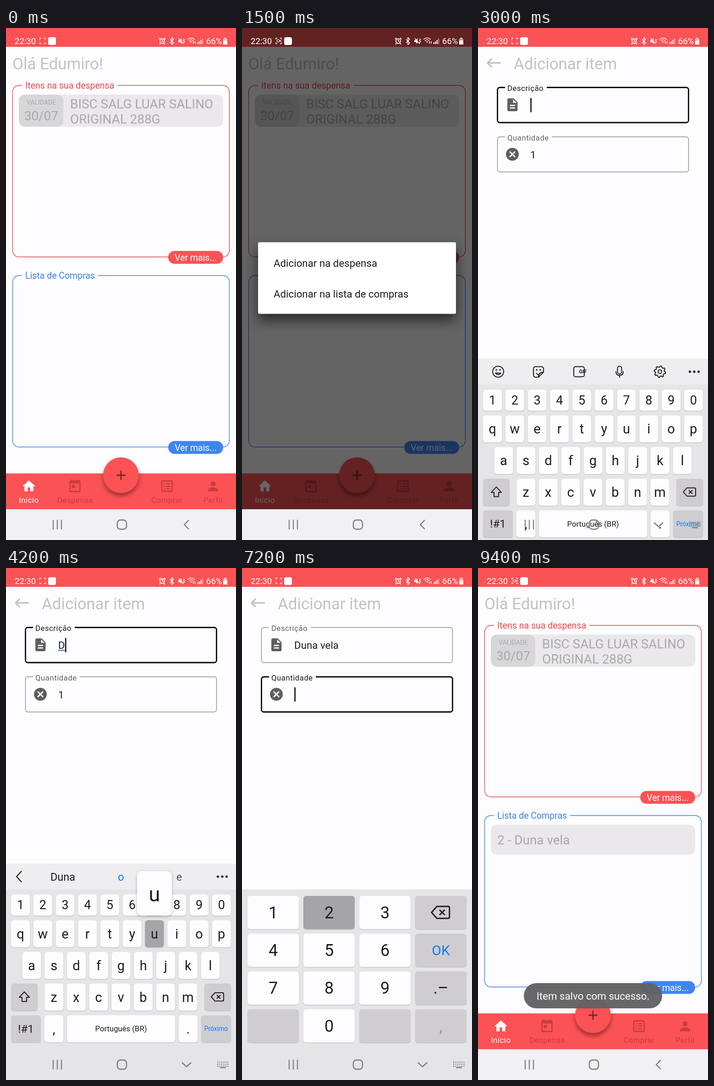
Write an HTML page with a canvas that moves like this. It is 502 px wide and 1115 px high and loops after 9.5 s.

```html
<!DOCTYPE html>
<html lang="pt-BR">
<head>
<meta charset="utf-8">
<title>Lista de compras</title>
<style>
html, body { margin: 0; width: 100%; height: 100%; overflow: hidden; background: #fdfcfe; }
canvas { display: block; width: 502px; height: 1115px; }
</style>
</head>
<body>
<canvas id="stage"></canvas>
<script>
const W = 502, H = 1115, NAV = 1048, LOOP = 9500, STEP = 100;
const PAPER = '#fdfcfe', RED = '#fb5255', BLUE = '#3f85f0', FAINT = '#c3c2c4', INK = '#1d1c1e';
const LINK = '#0a7cf5', KEY = '#fdfcfe', KEY_GRAY = '#cfcdd0', KEY_DOWN = '#a5a4a7', KEYBOARD = '#e5e4e7';

const canvas = document.getElementById('stage');
const ratio = window.devicePixelRatio || 1;
canvas.width = W * ratio;
canvas.height = H * ratio;
const ctx = canvas.getContext('2d');

const ramp = (t, from, to) => Math.min(1, Math.max(0, (t - from) / (to - from)));
const easeOut = u => 1 - (1 - u) ** 3;
const mix = (a, b, u) => a + (b - a) * u;
const during = (t, from, to) => t >= from && t < to;

function group(drawing, { x = 0, y = 0, scale = 1, alpha = 1 } = {}) {
  ctx.save();
  ctx.translate(x, y);
  ctx.scale(scale, scale);
  ctx.globalAlpha *= alpha;
  drawing();
  ctx.restore();
}
function text(str, x, y, size, color, align = 'left', spacing = 0) {
  ctx.font = `${size}px Roboto, sans-serif`;
  ctx.letterSpacing = spacing + 'px';
  ctx.textAlign = align;
  ctx.fillStyle = color;
  ctx.fillText(str, x, y);
}
function rect(x, y, w, h, color) {
  ctx.fillStyle = color;
  ctx.fillRect(x, y, w, h);
}
function box(x, y, w, h, r, fill, stroke, width) {
  ctx.beginPath();
  ctx.roundRect(x, y, w, h, r);
  if (fill) { ctx.fillStyle = fill; ctx.fill(); }
  if (stroke) { ctx.strokeStyle = stroke; ctx.lineWidth = width; ctx.stroke(); }
}
function disc(x, y, r, color) {
  ctx.beginPath();
  ctx.arc(x, y, r, 0, 7);
  ctx.fillStyle = color;
  ctx.fill();
}
function shadow(color, blur, y, drawing) {
  ctx.save();
  ctx.shadowColor = color;
  ctx.shadowBlur = blur * ratio;
  ctx.shadowOffsetY = y * ratio;
  drawing();
  ctx.restore();
}
// Strokes an SVG path whose origin is placed at (x, y).
function line(d, x, y, color, width, cap = 'butt') {
  ctx.save();
  ctx.translate(x, y);
  ctx.strokeStyle = color;
  ctx.lineWidth = width;
  ctx.lineCap = cap;
  ctx.lineJoin = 'round';
  ctx.stroke(new Path2D(d));
  ctx.restore();
}
function shape(d, x, y, color, scale = 1.394) {
  group(() => {
    ctx.fillStyle = color;
    ctx.fill(new Path2D(d), 'evenodd');
  }, { x, y, scale });
}

function statusBar(t) {
  const white = '#fff';
  text('22:30', 19, 35, 18.5, white);
  line('M-6-3V-6H-3M3-6H6V-3M6 3V6H3M-3 6H-6V3', 80, 28, white, 1.3);
  if (during(t % 1000, 400, 900)) {
    box(76.5, 25.5, 5, 5, 1, null, white, 1.2);
    line('M2 0L5-2V2Z', 80, 28, white, 1);
  }
  box(92, 20, 17, 17, 4, white);

  line('M-5 0a5 5 0 1 0 10 0a5 5 0 1 0-10 0M0-3V0L3 1M-7-4L-4-7M7-4L4-7M-4 5L-6 7M4 5L6 7', 341, 28.5, white, 1.8);
  line('M-4-4L4 4L0 8V-8L4-4L-4 4', 362, 28.5, white, 1.5);
  shape('M-7-2H-4L0-6V6L-4 2H-7Z', 383, 28.5, white, 1);
  line('M-7-6L4 6M3-5L6-3L3-1L6 1L3 4', 384, 28.5, white, 1.5);
  line('M-8-3Q0-10 8-3M-5 0Q0-5 5 0M-2 3Q0 1 2 3M5 6V1M9 1V6', 404, 28, white, 1.6);
  [4, 6, 9, 12].forEach((h, i) => rect(418 + i * 3.4, 35 - h, 2, h, i < 3 ? white : '#ffffff88'));
  text('66%', 437, 35, 18.5, white);
  rect(476, 21, 5, 3, '#ffffff99');
  box(474, 23, 9, 13, 1.5, '#ffffff88');
  rect(474, 27, 9, 9, white);
}

function navIcons(keyboardOpen, color) {
  line('M-9-10V11M0-10V11M9-10V11', 112, 1081, color, 2.2);
  box(243, 1071.5, 20, 20, 6.5, null, color, 2.4);
  if (!keyboardOpen) return line('M5-10L-5 0L5 10', 394, 1081.5, color, 2.4);
  line('M-10-4L0 5L10-4', 394, 1081, color, 2.4);
  for (let i = 0; i < 18; i++) rect(461 + i % 6 * 4.5, 1075 + Math.floor(i / 6) * 4.5, 2.2, 2.2, color);
  rect(467, 1087, 13, 2.2, color);
}

function panel(y, title, gapEnd, color, pill) {
  box(14.5, y, 473, 373.5, 14, null, color, 1.4);
  rect(35, y - 3, gapEnd - 35, 6, PAPER);
  text(title, 42, y + 6.5, 19.5, color);
  box(354, y + 360.5, 120, 28, 14, pill);
  text('Ver mais...', 414, y + 381.5, 19.5, '#fff', 'center');
}

function tab(label, x, color) {
  text(label, x, 1034, 16.7, color, 'center', 0.55);
}

function home(t, saved) {
  rect(0, 0, W, H, PAPER);
  rect(0, 0, W, 41, RED);
  text('Olá Edumiro!', 14, 89.5, 34.9, FAINT);

  panel(125, 'Itens na sua despensa', 243, '#e84a4c', RED);
  box(28, 145, 446, 70, 13, '#eae8ea');
  box(28, 145, 97, 70, 13, '#d7d6d8');
  text('VALIDADE', 77, 167, 13.9, '#a9a8aa', 'center');
  text('30/07', 77, 201, 27.9, '#a9a8aa', 'center');
  text('BISC SALG LUAR SALINO', 140, 175, 27.9, '#a9a8aa');
  text('ORIGINAL 288G', 140, 208, 27.9, '#a9a8aa');

  panel(539, 'Lista de Compras', 201, '#3a82e4', BLUE);
  if (saved) {
    box(28, 559, 446, 65, 13, '#eae8ea');
    text('2 - Duna vela', 42, 602, 27.9, '#a9a8aa');
  }

  const dark = '#cc3c40';
  rect(0, 970, W, 78, RED);
  shape('M10 20v-6h4v6h5v-8h3L12 3 2 12h3v8z', 33.3, 981, '#fff');
  tab('Início', 50, '#fff');
  box(139.5, 986.5, 22, 23, 2, null, dark, 2.8);
  rect(139, 986, 23, 6, dark);
  rect(142, 983, 3, 4, dark);
  rect(156, 983, 3, 4, dark);
  rect(143.5, 995, 7, 7, dark);
  tab('Despensa', 151, dark);
  box(340, 986.5, 22.5, 22.5, 1.5, null, dark, 2.8);
  for (let i = 0; i < 3; i++) {
    rect(344.5, 991 + i * 5.6, 2.8, 2.8, dark);
    rect(350, 991 + i * 5.6, 8.4, 2.8, dark);
  }
  tab('Comprar', 351.5, dark);
  disc(452, 992.5, 5.6, dark);
  shape('M12 14c-2.7 0-8 1.3-8 4v2h16v-2c0-2.7-5.3-4-8-4z', 435.3, 981, dark);
  tab('Perfil', 452, dark);

  shadow('#0006', 10, 6, () => disc(251, 974, 39, RED));
  const ripple = ramp(t, 100, 400);
  if (during(t, 100, 700)) disc(251, 974, 39 * ripple, `rgba(0,0,0,${0.12 * (1 - ramp(t, 400, 700))})`);
  line('M-10 0H10M0-10V10', 251, 974, '#7a282b', 2.9);
  rect(0, NAV, W, H - NAV, '#f1f0f3');
}

function dialog(t) {
  const leave = ramp(t, 1600, 1750);
  const shown = ramp(t, 600, 850) * (1 - leave);
  if (!shown) return;
  rect(0, 0, W, NAV, `rgba(0,0,0,${0.6 * shown})`);
  const scale = mix(0.9, 1, easeOut(ramp(t, 600, 1000)));
  group(() => {
    shadow('#0009', 28, 14, () => box(35, 466.5, 432, 156, 3, '#fff'));
    if (t >= 1600) rect(35, 545, 432, 67, '#0000000f');
    text('Adicionar na despensa', 69, 519.5, 22.3, INK);
    text('Adicionar na lista de compras', 69, 586.5, 22.3, INK);
  }, { x: 251 * (1 - scale), y: 544.5 * (1 - scale), scale, alpha: shown });
}

// Each press: time down and key; the character is committed 100 ms later.
const presses = [[3800, 'shift'], [4000, 'D'], [4200, 'u'], [4400, 'n'], [4600, 'a'], [4800, ' '],
  [4900, 'v'], [5030, 'e'], [5160, 'l'], [5280, 'a']];
const PRESS = 100, NUMERIC_AT = 5900;
const typedAt = t => presses.filter(([at, key]) => key.length === 1 && at + PRESS <= t).map(p => p[1]).join('');
const pressedAt = t => (presses.find(([at]) => during(t, at, at + PRESS)) || [])[1];
const quantityAt = t => t < 6900 ? '1' : t < 7300 ? '' : '2';

function caretVisible(t) {
  if (t < 3800) return during(t, 2500, 3100) || t >= 3600;
  return !during(t, 6400, 6900) && t < 7800;
}

function field(y, label, gapEnd, focused, floated) {
  box(42.5, y, 417, 76.5, 5, null, focused ? '#0c0b0d' : '#918f92', focused ? 2.8 : 1.4);
  if (floated) rect(59, y - 4, gapEnd - 59, 8, PAPER);
  text(label, mix(114, 64, floated), mix(y + 47, y + 7.5, floated), mix(22.3, 16.7, floated),
    focused ? INK : '#626063', 'left', 0.55 * floated);
}

function value(str, y, focused, t, composing) {
  text(str, 114, y + 8.5, 22.3, INK);
  const width = ctx.measureText(str).width;
  if (composing) {
    const start = ctx.measureText(str.slice(0, str.lastIndexOf(' ') + 1)).width;
    if (width > start) rect(114 + start, y + 10.5, width - start, 2.6, '#3a8fdc');
  }
  if (focused && caretVisible(t)) rect(114.3 + width, y - 15, 2.6, 31, '#0c0b0d');
}

function addScreen(t) {
  const inDescription = during(t, 2400, NUMERIC_AT), inQuantity = t >= NUMERIC_AT;
  rect(0, 0, W, H, PAPER);
  rect(0, 0, W, 41, RED);
  line('M15 0H-14M-5-9L-14 0L-5 9', 35, 76, FAINT, 3.4);
  text('Adicionar item', 78, 89.5, 34.9, FAINT);

  field(129.5, 'Descrição', 150, inDescription, ramp(t, 2400, 2550));
  shape('M14 2H6C5 2 4 3 4 4V20C4 21 5 22 6 22H18C19 22 20 21 20 20V8ZM16 18H8V16H16ZM16 14H8V12H16ZM13 9V3.5L18.5 9Z', 58.5, 150.5, '#5f5d60');
  if (t >= 2400) value(typedAt(t), 167.5, inDescription, t, inDescription);

  field(237, 'Quantidade', 161, inQuantity, 1);
  disc(75, 275, 14, '#5f5d60');
  line('M-6-6L6 6M6-6L-6 6', 75, 275, '#fff', 2.8);
  value(quantityAt(t), 275, inQuantity, t, false);

  box(70, 951, 362, 69.5, 34.75, '#27a844');
  if (during(t, 8300, 8800)) box(70, 951, 362, 69.5, 34.75, '#0000001c');
  text('SALVAR', 251, 999, 34.9, '#fff', 'center');
  rect(0, NAV, W, H - NAV, '#f1f0f3');
}

function key(x, y, w, h, label, size, fill = KEY, color = INK) {
  shadow('#0003', 1.5, 1, () => box(x, y, w, h, 6, fill));
  text(label, x + w / 2, y + h / 2 + size * 0.35, size, color, 'center');
}
function backspaceIcon(x, y, scale) {
  group(() => line('M-14 0L-6-9H11Q13-9 13-7V7Q13 9 11 9H-6ZM-2-4L6 4M6-4L-2 4', 0, 0, INK, 2), { x, y, scale });
}

function toolbar(typed) {
  const y = 672;
  rect(0, 644, W, 56, '#eeedef');
  [462.5, 472, 481.5].forEach(x => disc(x, y, 2.6, INK));
  if (typed) {
    line('M5-12L-6 0L5 12', 29, y, INK, 2.2);
    text(typed.includes(' ') ? 'vela' : 'Duna', 124, y + 8.5, 23.5, INK, 'center');
    text('o', 251, y + 8.5, 23.5, LINK, 'center');
    text('e', 378, y + 8.5, 23.5, '#555', 'center');
    return;
  }
  box(32, y - 12, 24, 24, 12, null, INK, 2);
  line('M-6 3Q0 10 6 3Z', 44, y, INK, 2);
  line('M0 12H-6Q-11 12-11 6V-6Q-11-11-6-11H6Q11-11 11-6V1L0 12Q0 1 11 1M-5 3Q-3 6 0 6', 132, y, INK, 2);
  [40, 48, 128, 136].forEach(x => disc(x, y - 4, 1.7, INK));
  box(209, y - 11, 23, 22, 4, null, INK, 2);
  ctx.font = 'bold 11px Roboto, sans-serif';
  ctx.fillText('GIF', 220.5, y + 4);
  box(304.5, y - 12, 9, 17, 4.5, null, INK, 2);
  line('M-8-1Q-8 8 0 8Q8 8 8-1M0 8V13', 309, y, INK, 2);
  ctx.beginPath();
  for (let i = 0; i < 32; i++) {
    const r = i % 4 < 2 ? 12.5 : 9.8, a = (i + 0.5) * Math.PI / 16;
    ctx.lineTo(397 + r * Math.cos(a), y + r * Math.sin(a));
  }
  ctx.closePath();
  ctx.strokeStyle = INK;
  ctx.lineWidth = 2;
  ctx.stroke();
  box(393, y - 4, 8, 8, 4, null, INK, 2);
}

const letterRows = [['1234567890', 11, 711, 46], ['qwertyuiop', 11, 767, 59], ['asdfghjkl', 35.5, 836, 59], ['zxcvbnm', 84, 905, 59]];

function letterPad(t) {
  const pressed = pressedAt(t), typed = typedAt(t), upper = during(t, 3900, 4100);
  rect(0, 644, W, H - 644, KEYBOARD);
  toolbar(typed);
  const press = (name, normal) => pressed === name ? KEY_DOWN : normal;
  let popup;
  for (const [chars, left, y, h] of letterRows) {
    [...chars].forEach((c, i) => {
      const x = left + i * 48.75, down = pressed && pressed.toLowerCase() === c;
      const label = upper ? c.toUpperCase() : c;
      key(x, y, 41, h, label, h < 50 ? 27 : 29, down ? KEY_DOWN : KEY);
      if (down) popup = [x + 20.5, y, label];
    });
  }
  key(11, 905, 58, 59, '', 20, press('shift', KEY_GRAY));
  line('M0-11L11 1H5V10H-5V1H-11Z', 40, 934, INK, 2);
  key(433, 905, 58, 59, '', 20, KEY_GRAY);
  backspaceIcon(462, 934, 1);
  key(11, 974, 65, 59, '!#1', 24, KEY_GRAY);
  key(84, 974, 41, 59, ',', 29);
  key(133, 974, 236, 59, 'Português (BR)', 16.7, press(' ', KEY));
  key(377, 974, 41, 59, '.', 29);
  key(426, 974, 65, 59, 'Próximo', 13.9, during(t, 5700, NUMERIC_AT) ? KEY_DOWN : KEY_GRAY, LINK);
  if (popup) {
    const [x, y, label] = popup;
    shadow('#0004', 6, 2, () => box(x - 38, y - 107, 76, 97, 10, KEY));
    text(label, x, y - 41, 45, INK, 'center');
  }
}

function numberPad(t) {
  rect(0, 700, W, H - 700, KEYBOARD);
  const labels = ['1', '2', '3', '', '4', '5', '6', 'OK', '7', '8', '9', '.–', '', '0', '', ','];
  labels.forEach((label, i) => {
    const x = 12 + i % 4 * 122, y = 714 + Math.floor(i / 4) * 82.3;
    const down = (label === '2' && during(t, 7200, 7300)) || (i === 3 && during(t, 6900, 7000));
    const fill = down ? KEY_DOWN : i % 4 === 3 || !label ? KEY_GRAY : KEY;
    const color = label === 'OK' ? LINK : label === ',' ? '#98979a' : INK;
    key(x, y, 112, 72.5, label, label === 'OK' ? 30 : 36, fill, color);
  });
  backspaceIcon(434, 750, 1.45);
}

function toast(t) {
  group(() => {
    box(100, 904, 302, 55, 27.5, 'rgba(98,97,99,.96)');
    text('Item salvo com sucesso.', 251, 939.5, 22.3, '#fff', 'center');
  }, { alpha: ramp(t, 8700, 9000) });
}

function draw(t) {
  ctx.setTransform(ratio, 0, 0, ratio, 0, 0);
  rect(0, 0, W, H, PAPER);

  const page = easeOut(ramp(t, 1700, 2185)) - easeOut(ramp(t, 8500, 8950));
  if (page < 1) {
    group(() => home(t, t >= 8500), { y: -50 * page });
    rect(0, 0, W, H, `rgba(0,0,0,${0.12 * page})`);
    dialog(t);
  }
  if (page > 0) group(() => addScreen(t), { y: 116 * (1 - page), alpha: Math.min(1, page * 3) });

  const keyboardOpen = during(t, 2800, 8000);
  if (during(t, 2800, 8100)) {
    const rise = 471 * (1 - easeOut(ramp(t, 2800, 3240)));
    const fall = 415 * ramp(t, 7800, 8100) ** 2;
    group(() => (t < NUMERIC_AT ? letterPad : numberPad)(t), { y: rise + fall });
  }
  toast(t);
  statusBar(t);
  navIcons(keyboardOpen, during(t, 1700, 2000) ? 'rgba(228,228,228,.65)' : '#7c7b7e');
}

const start = performance.now();
function frame() {
  const t = (performance.now() - start) % LOOP;
  draw(Math.floor(t / STEP) * STEP);
  requestAnimationFrame(frame);
}
frame();
</script>
</body>
</html>
```
